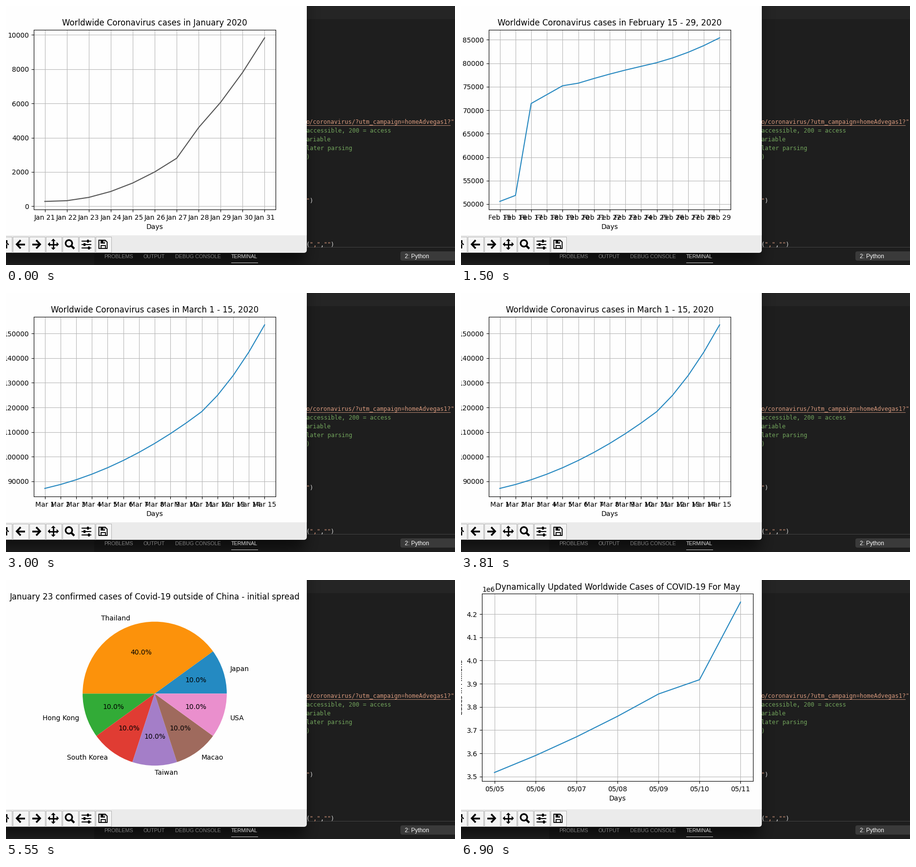
Recreate the animation shown at these times as a matplotlib script. Size 921x532 px, loop 8 s.

```python
import numpy as np
import matplotlib.pyplot as plt
from matplotlib.animation import FuncAnimation
from matplotlib.patches import Circle, FancyBboxPatch, Polygon, Rectangle

W, H, DPI = 921, 532, 100
STEP = 50
HOLDS = [300, 1200, 1500, 1350, 1200, 1350, 1100]
ENDS = np.cumsum(HOLDS)

BLUE, GRAY = "#2688c0", "#555555"
WEDGES = ["#248ac2", "#fc920b", "#32ab37", "#e03c33",
          "#a47ec8", "#9f6a5d", "#ea8fcd"]
STRING, COMMENT, PLAIN = "#d8997d", "#71a35b", "#dcdcdc"

fig = plt.figure(figsize=(W / DPI, H / DPI), dpi=DPI, facecolor="#1e1e1e")


# ---------- editor behind the window ----------

def backdrop():
    """Dark editor with the soft shadow the window drops on it."""
    y, x = np.mgrid[0:H, 0:W] + 0.5
    base = np.full((H, W), 30.0)
    base[:27] = 37
    base[500:, :181] = 37
    soft = lambda d: 1 / (1 + np.exp(-d / 9))
    shade = 1 - 0.6 * soft(612 - x) * soft(528 - y)
    level = (base * shade).round().astype(np.uint8)
    return np.dstack([level] * 3)


fig.figimage(backdrop(), zorder=-1)
desk = fig.add_axes([0, 0, 1, 1])
desk.set(xlim=(0, W), ylim=(H, 0))
desk.axis("off")


def box(x0, y0, x1, y1, color, edge="none", z=1):
    desk.add_patch(Rectangle((x0, y0), x1 - x0, y1 - y0, fc=color, ec=edge,
                             lw=0.72, zorder=z))


def rounded(x0, y0, x1, y1, r, color, z=1):
    style = f"round,pad=0,rounding_size={r}"
    desk.add_patch(FancyBboxPatch((x0, y0), x1 - x0, y1 - y0, boxstyle=style,
                                  fc=color, ec="none", zorder=z))


def stroke(points, width):
    xs, ys = zip(*points)
    desk.plot(xs, ys, color="black", lw=width * 0.72, zorder=6,
              solid_capstyle="butt", solid_joinstyle="miter")


def write(x, y, text, color, px, font="Liberation Sans"):
    desk.text(x, y, text, color=color, fontsize=px * 0.72, family=font,
              va="baseline", zorder=2)


def code(row, *parts):
    """One line of code from (text, colour) parts, on an 18 px row pitch."""
    x = 615.6
    for text, color in parts:
        write(x, 242 + 18 * row, text, color, 12, "DejaVu Sans Mono")
        x += 7.224 * len(text)


code(0, ('o/coronavirus/?utm_campaign=homeAdvegas1?"', STRING))
box(616, 245, 912, 246, "#b58570")
code(1, ("accessible, 200 = access", COMMENT))
code(2, ("ariable", COMMENT))
code(3, ("later parsing", COMMENT))
code(4, (")", COMMENT))
code(9, ('"', STRING), (")", PLAIN))
code(14, ("(", PLAIN), ('","', STRING), (",", PLAIN), ('""', STRING),
     (")", PLAIN))

box(610, 495, W, 496, "#444444")
for x, name in [(201, "PROBLEMS"), (281, "OUTPUT"), (347, "DEBUG CONSOLE")]:
    write(x, 518, name, "#808080", 10.8)
write(462, 518, "TERMINAL", "#d8d8d8", 10.8)
box(462, 527, 517, 528, "#c8c8c8")
rounded(809, 504, W + 20, 523, 4, "#3a3a3a")
write(818, 518, "2: Python", "#f8f8f8", 11.8)


# ---------- plot window and its toolbar ----------

rounded(-30, -30, 617, 507, 6, "#ebebeb", z=3)
box(-30, -30, 617, 471, "#fefefe", z=4)
for left in range(-21, 184, 34):
    box(left + 0.5, 473.5, left + 32.5, 505.5, "#f5f5f5", "#b4b4b4", z=5)

MID = 489.5


def fill(points):
    desk.add_patch(Polygon(points, fc="black", ec="none", zorder=6))


def arrow(tip, way):
    stroke([(tip + way * 10, MID - 8.5), (tip + way * 2, MID),
            (tip + way * 10, MID + 8.5)], 3.6)
    stroke([(tip + way * 3, MID), (tip + way * 18.5, MID)], 3.6)


def home():
    stroke([(-6, 480), (5.5, 490.5)], 2.4)
    fill([(-12, 498), (-12, 489), (-6, 483), (2.5, 490.5), (2.5, 498)])
    box(0, 481, 2.6, 486, "black", z=6)


def move(cx):
    for dx, dy in [(1, 0), (-1, 0), (0, 1), (0, -1)]:
        stroke([(cx, MID), (cx + 8 * dx, MID + 8 * dy)], 2.8)
        bx, by = cx + 6.8 * dx, MID + 6.8 * dy
        fill([(cx + 11.5 * dx, MID + 11.5 * dy),
              (bx + 4.7 * dy, by + 4.7 * dx), (bx - 4.7 * dy, by - 4.7 * dx)])


def zoom():
    desk.add_patch(Circle((129, 487.5), 6.7, fc="none", ec="black",
                          lw=2.4, zorder=6))
    stroke([(133.5, 492), (140, 498.5)], 4.2)


def sliders():
    for y, knob in [(483, 168), (490, 160.5), (497, 170)]:
        stroke([(155, y), (175, y)], 2)
        box(knob - 2, y - 2.8, knob + 2, y + 2.8, "black", z=7)


def floppy():
    stroke([(190.5, 481), (203.5, 481), (207.5, 485), (207.5, 498),
            (190.5, 498), (190.5, 480.2)], 1.9)
    box(193.5, 481, 203, 487.5, "black", z=6)
    box(199.5, 482, 201.5, 486, "#f5f5f5", z=7)
    stroke([(194.5, 498), (194.5, 491.5), (203.5, 491.5), (203.5, 498)], 1.8)


home()
arrow(20, 1)
arrow(72, -1)
move(97)
zoom()
sliders()
floppy()


# ---------- charts ----------

def growth(start, *arcs):
    """Daily values along parabolas; an arc is (end day, end value, bow)."""
    values = [start]
    for day, end, bow in arcs:
        t = np.linspace(0, 1, day - len(values) + 2)[1:]
        first = values[-1]
        values.extend(first + (end - first) * t + 4 * bow * t * (1 - t))
    return values


def frame(title, left=57, top=48.6, right=553, bottom=418.2):
    ax = fig.add_axes([left / W, 1 - bottom / H,
                       (right - left) / W, (bottom - top) / H])
    ax.patch.set_visible(False)
    ax.set_title(title, y=1.0)
    return ax


def chart(title, label, first, cases, color=BLUE, **area):
    ax = frame(title, **area)
    days = [label.format(first + i) for i in range(len(cases))]
    ax.plot(days, cases, color=color)
    ax.grid(True, color="#b8b8b8")
    ax.set_xlabel("Days")
    return ax


def month(span, label, first, cases, color=BLUE):
    return chart(f"Worldwide Coronavirus cases in {span}", label, first,
                 cases, color)


def spread():
    ax = frame("January 23 confirmed cases of Covid-19 outside of China"
               " - initial spread")
    places = ["Japan", "Thailand", "Hong Kong", "South Korea", "Taiwan",
              "Macao", "USA"]
    _, labels, _ = ax.pie([1, 4, 1, 1, 1, 1, 1], labels=places,
                          colors=WEDGES, autopct="%1.1f%%")
    labels[4].set_ha("left")
    return ax


def live():
    cases = growth(3517300, (4, 3855800, -15500), (5, 3917400, 0),
                   (6, 4252000, 0))
    ax = chart("Dynamically Updated Worldwide Cases of COVID-19 For May",
               "05/{:02d}", 5, cases,
               left=43.4, top=27.9, right=598.6, bottom=412.9)
    ax.set_ylabel("Cases in Millions")
    return ax


scenes = [
    month("January 2020", "Jan {}", 21,
          growth(282, (6, 2800, -680), (7, 4593, 0), (10, 9826, -306)), GRAY),
    month("February 1 - 14, 2020", "Feb {}", 1,
          growth(11950, (4, 24550, -860), (13, 49050, 2300))),
    month("February 15 - 29, 2020", "Feb {}", 15,
          growth(50580, (1, 51860, 0), (2, 71430, 0), (4, 75200, 0),
                 (5, 75750, 0), (9, 79331, 140), (14, 85400, -670))),
    month("March 1 - 15, 2020", "Mar {}", 1,
          growth(87140, (10, 118320, -4250), (14, 153520, -2950))),
    month("March 16 - 31, 2020", "Mar {}", 16,
          growth(167500, (11, 509200, -59000), (15, 750900, 4500))),
    spread(),
    live(),
]


def update(i):
    shown = np.searchsorted(ENDS, i * STEP, side="right")
    for k, ax in enumerate(scenes):
        ax.set_visible(k == shown)
    return scenes


anim = FuncAnimation(fig, update, frames=int(ENDS[-1]) // STEP, interval=STEP,
                     init_func=lambda: update(0), repeat=True, repeat_delay=0)
plt.show()
```
